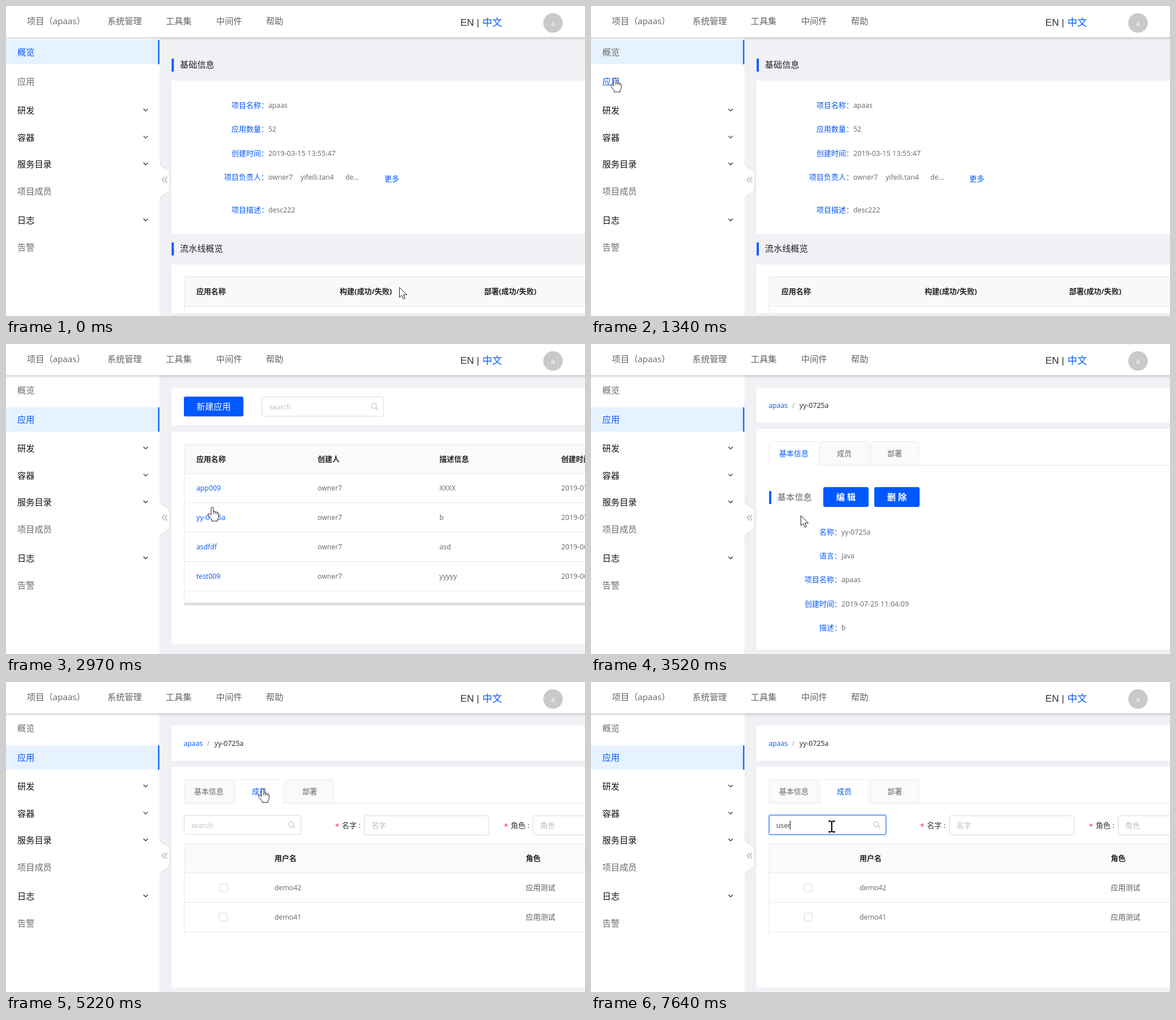
Recreate the animation shown at these times as an HTML page with a canvas. Size 1022x548 px, loop 8000 ms.

```html
<!DOCTYPE html>
<html lang="zh">
<head>
<meta charset="utf-8">
<title>Console</title>
<style>
html, body { margin: 0; width: 100%; height: 100%; overflow: hidden; background: #fff; }
canvas { display: block; width: 1022px; height: 548px; }
</style>
</head>
<body>
<canvas id="stage" width="1022" height="548"></canvas>
<script>
const ctx = document.getElementById('stage').getContext('2d');
const W = 1022, H = 548, LOOP = 8000;
const BLUE = '#0058ff', GREY = '#666', DARK = '#222', LINE = '#e8e8e8', BG = '#f0f1f5', HINT = '#bfbfbf';
const FONT = '"Open Sans", "Noto Sans CJK SC", "Noto Sans CJK", sans-serif';
const BIG = 15.2, LABEL = 13, LATIN = 12.3;

const clamp = v => Math.max(0, Math.min(1, v));
const ease = p => p * p * (3 - 2 * p);
const inside = (p, x0, y0, x1, y1) => p.x >= x0 && p.x < x1 && p.y >= y0 && p.y < y1;

function rect(x0, y0, x1, y1, color) {
  ctx.fillStyle = color;
  ctx.fillRect(x0, y0, x1 - x0, y1 - y0);
}

function box(x0, y0, x1, y1, r, fill, stroke) {
  ctx.beginPath();
  ctx.roundRect(x0 + .5, y0 + .5, x1 - x0 - 1, y1 - y0 - 1, r);
  if (fill) { ctx.fillStyle = fill; ctx.fill(); }
  ctx.lineWidth = 1;
  ctx.strokeStyle = stroke || fill;
  ctx.stroke();
}

// y is the optical middle of the line
function text(s, x, y, size = LABEL, color = GREY, weight = 400, align = 'left', family = FONT) {
  ctx.font = `${weight} ${size}px ${family}`;
  ctx.fillStyle = color;
  ctx.textAlign = align;
  ctx.fillText(s, x, Math.round(y + size * .38));
}

const card = (y0, y1) => rect(292, y0, W, y1, '#fff');

function line(points, color, width = 1) {
  ctx.beginPath();
  points.forEach(([x, y]) => ctx.lineTo(x, y));
  ctx.strokeStyle = color;
  ctx.lineWidth = width;
  ctx.stroke();
}

function title(s, x, y, color = DARK) {
  rect(x + .4, y - 11, x + 4.2, y + 12, BLUE);
  text(s, x + 15, y - .7, BIG, color);
}

function fields(rows, x) {
  for (const [label, value, y] of rows) {
    text(label + '：', x, y, LABEL, BLUE, 400, 'right');
    text(value, x, y, /:/.test(value) ? 12.6 : LATIN);
  }
}

function tableHead(y, columns, bottom, fill = '#fafafa') {
  rect(314, y, W, y + 52, fill);
  rect(314, y, W, y + 1, LINE);
  rect(314, y + 52, W, y + 53, LINE);
  rect(314, y, 315, bottom, LINE);
  for (const [s, x] of columns) text(s, x, y + 26.5, LABEL, DARK, 700);
}

function searchBox(x0, y0, x1, border = '#d9d9d9') {
  box(x0, y0, x1, y0 + 35, 2, '#fff', border);
  const x = x1 - 17.5, y = y0 + 16.5;
  ctx.beginPath();
  ctx.arc(x, y, 4.5, 0, 7);
  ctx.lineWidth = 1;
  ctx.strokeStyle = '#b0b0b0';
  ctx.stroke();
  line([[x + 3.3, y + 3.3], [x + 6.8, y + 6.8]], '#b0b0b0', 1.2);
}

function button(s, x0, y0, x1, weight) {
  box(x0, y0, x1, y0 + 35, 2, BLUE);
  text(s, (x0 + x1) / 2, y0 + 17, BIG, '#fff', weight, 'center');
}

// ---- pointer ----

// start, end, steps, x, y
const moves = [
  [80, 700, 9, 68, 135], [790, 870, 2, 51, 113], [1030, 1180, 3, 42, 127],
  [1970, 1970, 1, 75, 138], [2050, 2750, 10, 371, 291], [2820, 2820, 1, 371, 298],
  [2970, 2970, 1, 364, 288], [3050, 3140, 2, 370, 302], [3520, 3520, 1, 370, 303],
  [3990, 4450, 7, 457, 188], [4840, 4840, 1, 448, 175], [4990, 4990, 1, 453, 188],
  [5530, 6000, 7, 425, 255]
];

function pointerAt(t) {
  let x = 694, y = 497;
  for (const [t0, t1, n, toX, toY] of moves) {
    if (t < t0) break;
    const gap = (t1 - t0) / (n - 1) || 1;
    const k = Math.min(n, Math.floor((t - t0) / gap + .2) + 1);
    const p = ease(k / n);
    x += (toX - x) * p;
    y += (toY - y) * p;
  }
  return { x, y };
}

const ARROW = new Path2D('M.5 .5V18L4.6 14.3L7.4 21L10.2 19.8L7.5 13.5H13.6Z');
const HAND = new Path2D('M-2 2.2Q-2 .5 0 .5Q2 .5 2 2.2V8.2Q3.5 6.8 5.3 8.6Q7 7.8 8.3 9.6' +
  'Q11.5 9.4 11.4 12V17Q11.2 20 9.3 22V25H-1V22.5Q-3.5 19.5-7 14.6Q-8 11.5-5.2 11.6L-2 14.5Z');
const KNUCKLES = new Path2D('M2 8V12.5M5.3 8.8V12.5M8.3 9.8V13');

function drawPointer(p, shape) {
  ctx.save();
  ctx.translate(Math.round(p.x), Math.round(p.y));
  if (shape === 'beam') {
    rect(-1, -9, 1, 10, '#000');
    for (const y of [-10, 9]) {
      rect(-6, y, -1, y + 2, '#000');
      rect(1, y, 6, y + 2, '#000');
    }
  } else {
    const path = shape === 'hand' ? HAND : ARROW;
    ctx.lineJoin = 'round';
    ctx.lineWidth = 1;
    ctx.fillStyle = '#fff';
    ctx.strokeStyle = '#1c1c2c';
    ctx.fill(path);
    ctx.stroke(path);
    if (shape === 'hand') ctx.stroke(KNUCKLES);
  }
  ctx.restore();
}

function pointerShape(p, t) {
  if (t >= 5150 && inside(p, 314, 236, 521, 271)) return 'beam';
  if (inside(p, 0, 60, 271, 450)) return 'hand';
  if (t >= 1420 && t < 3370 && inside(p, 335, 286, 390, 316)) return 'hand';
  if (t >= 3370 && inside(p, 314, 172, 579, 214)) return 'hand';
  return 'arrow';
}

// ---- frame around the pages ----

const menu = [
  ['概览', 81.2], ['应用', 133.2], ['研发', 184.2, 1], ['容器', 232, 1],
  ['服务目录', 279.4, 1], ['项目成员', 327.2], ['日志', 378.4, 1], ['告警', 426.4]
];

function sidebar(t, p) {
  rect(0, 55, 271, H, '#fff');
  const picked = clamp((t - 1340) / 240);
  [[60, 1 - picked], [112, picked]].forEach(([y, alpha]) => {
    ctx.globalAlpha = alpha;
    rect(0, y, 271, y + 43, '#e6f2ff');
    rect(268.4, y, 270.6, y + 43, BLUE);
  });
  ctx.globalAlpha = 1;
  const active = t < 1340 ? 0 : 1;
  menu.forEach(([s, y, group], i) => {
    const lit = i === active || (!group && inside(p, 0, y - 22, 271, y + 22));
    text(s, 20, y, BIG, lit ? BLUE : group ? '#111' : '#6b6b6b');
    if (group) line([[242.7, y - 2.4], [246.5, y + 1.4], [250.3, y - 2.4]], '#333', 1.3);
  });
  const flap = new Path2D('M270 274C272 291 288 285 288 297V322C288 333 272 328 270 346Z');
  ctx.save();
  ctx.beginPath();
  ctx.rect(271, 260, 30, 100);
  ctx.clip();
  ctx.shadowColor = 'rgba(0,0,0,.12)';
  ctx.shadowBlur = 3;
  ctx.fillStyle = '#fff';
  ctx.fill(flap);
  ctx.restore();
  for (const x of [275.5, 280.5]) line([[x + 4, 302], [x, 307], [x + 4, 312]], '#999', 1.2);
}

function header() {
  const shade = ctx.createLinearGradient(0, 55, 0, 61);
  shade.addColorStop(0, 'rgba(0,0,0,.15)');
  shade.addColorStop(1, 'rgba(0,0,0,0)');
  rect(0, 55, W, 61, shade);
  rect(0, 0, W, 55, '#fff');
  rect(0, 0, W, 1, '#effcf7');
  [['项目（apaas）', 37], ['系统管理', 179], ['工具集', 282], ['中间件', 371], ['帮助', 459]]
    .forEach(([s, x]) => text(s, x, 26.2, BIG, '#636363'));
  text('EN |', 802, 28, 17.3, '#333', 400, 'left', '"Liberation Sans", sans-serif');
  text('中文', 841, 28, 17.3, BLUE);
  ctx.beginPath();
  ctx.arc(965.5, 30, 17.2, 0, 7);
  ctx.fillStyle = '#c9c9c9';
  ctx.fill();
  text('a', 965.5, 30.5, 12.5, '#fff', 400, 'center');
}

// ---- pages ----

function overview() {
  title('基础信息', 292, 104);
  card(132, 403);
  fields([
    ['项目名称', 'apaas', 175], ['应用数量', '52', 217.5], ['创建时间', '2019-03-15 13:55:47', 260],
    ['项目负责人', 'owner7', 302], ['项目描述', 'desc222', 360.4]
  ], 463);
  text('yifeili.tan4', 520, 302, LATIN);
  text('de...', 599, 302, LATIN);
  text('更多', 668, 305, LABEL, BLUE);
  title('流水线概览', 292, 429);
  card(457, 543);
  tableHead(478, [['应用名称', 336], ['构建(成功/失败)', 589], ['部署(成功/失败)', 844]], 543, '#f8f9f9');
}

const apps = [
  ['app009', 'XXXX', '2019-07-29'], ['yy-0725a', 'b', '2019-07-25'],
  ['asdfdf', 'asd', '2019-06-28'], ['test009', 'yyyyy', '2019-06-27']
];

function appList(t) {
  card(77, 144);
  button('新建应用', 314, 93, 419, 400);
  searchBox(451, 93, 667);
  text('search', 465, 111, LATIN, HINT);
  card(155, 531);
  tableHead(177, [['应用名称', 336], ['创建人', 550], ['描述信息', 765], ['创建时间', 980]], 457);
  if (t < 1570) return;
  apps.forEach(([name, note, date], i) => {
    const y = 254.5 + i * 52;
    text(name, 336, y, LATIN, BLUE);
    text('owner7', 550, y, LATIN);
    text(note, 765, y, LATIN);
    text(date, 980, y, 12.6);
    rect(314, y + 25.5, W, y + 26.5, LINE);
  });
  box(314, 457, W + 10, 462, 2, '#dedede');
}

function appFrame(tab, p) {
  card(77, 139);
  text('apaas', 313.5, 108, LATIN, BLUE);
  text('/', 355, 108, LATIN, '#999');
  text('yy-0725a', 368, 108, LATIN, DARK);
  card(150, 540);
  rect(314, 214, W, 215, LINE);
  [['基本信息', 314, 402], ['成员', 404, 490], ['部署', 493, 579]].forEach(([s, x0, x1], i) => {
    const on = i === tab, hot = inside(p, x0, 172, x1, 214);
    box(x0, 172, x1, 215, [4, 4, 0, 0], on ? '#fff' : '#fafafa', LINE);
    if (on) rect(x0 + 1, 214, x1 - 1, 216, '#fff');
    text(s, (x0 + x1) / 2, 193.5, LABEL, on || hot ? BLUE : GREY, 400, 'center');
  });
}

function details(t) {
  title('基本信息', 314, 271, GREY);
  button('编 辑', 410, 253, 490, 700);
  button('删 除', 500, 253, 580, 700);
  if (t < 3450) return;
  fields([
    ['名称', 'yy-0725a', 332], ['语言', 'java', 374], ['项目名称', 'apaas', 416.5],
    ['创建时间', '2019-07-25 11:04:09', 459], ['描述', 'b', 501]
  ], 442);
}

const keyTimes = [7240, 7320, 7470, 7640];

function memberSearch(t, p) {
  const glow = clamp((t - 6320) / 300);
  if (glow) {
    ctx.globalAlpha = glow;
    box(312, 233, 523, 272, 4, '#d6e4ff');
    ctx.globalAlpha = 1;
  }
  const hot = glow || inside(p, 314, 236, 521, 271);
  searchBox(314, 235, 521, hot ? '#2768f5' : '#d9d9d9');
  const typed = 'user'.slice(0, keyTimes.filter(k => t >= k).length);
  text(typed || 'search', 327, 253.5, LATIN, typed ? '#444' : HINT);
  if (typed) {
    const x = Math.floor(327 + ctx.measureText(typed).width - .5);
    rect(x, 245, x + 1, 261, '#111');
  } else if (t >= 6320 && t < 6850) {
    rect(327, 244, 329, 261, '#111');
  }
}

function members(t, p) {
  memberSearch(t, p);
  [['名字', 582, 853], ['角色', 880, 1101]].forEach(([s, x, end]) => {
    text('*', x - 1, 255, LABEL, '#f5222d');
    text(s + ' :', x + 11, 253.5, LABEL, '#333');
    box(x + 50, 236, end, 271, 2, '#fff', '#d9d9d9');
    text(s, x + 63, 253.5, LABEL, HINT);
  });
  tableHead(285, [['用户名', 474], ['角色', 917.5]], 447);
  ['demo42', 'demo41'].forEach((name, i) => {
    const y = 363.5 + i * 52;
    box(376, y - 7.5, 391, y + 7.5, 2, '#fff', '#d9d9d9');
    text(name, 474, y, LATIN);
    text('应用测试', 917.5, y, LABEL, '#5a5a5a');
    rect(314, y + 25.5, W, y + 26.5, LINE);
  });
}

function draw(t) {
  const p = pointerAt(t);
  rect(0, 0, W, H, BG);
  if (t < 1420) overview();
  else if (t < 3370) appList(t);
  else {
    appFrame(t < 5070 ? 0 : 1, p);
    if (t < 5150) details(t);
    else members(t, p);
  }
  sidebar(t, p);
  header();
  drawPointer(p, pointerShape(p, t));
}

const start = performance.now();
function tick() {
  draw((performance.now() - start) % LOOP);
  requestAnimationFrame(tick);
}
tick();
</script>
</body>
</html>
```
